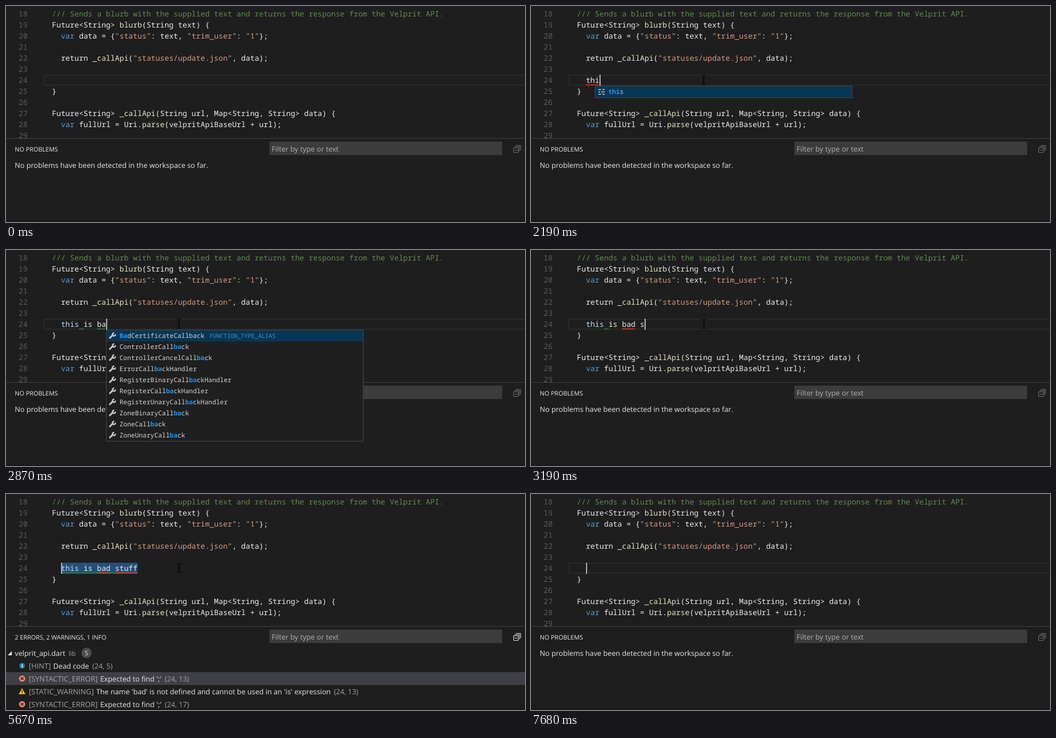
Write an HTML page that moves like this. It is 887 px wide and 371 px high and loops after 8070 ms.

```html
<!DOCTYPE html>
<html lang="en">
<head>
<meta charset="utf-8">
<title>Editor</title>
<style>
  html, body { margin: 0; width: 100%; height: 100%; overflow: hidden; background: #1e1e1e; }
  svg { display: block; }
  text { white-space: pre; text-rendering: geometricPrecision; fill: #d4d4d4; }
  .code { font: 12.83px "Noto Sans Mono", monospace; fill: #ececec; }
  .item { font: 11px "Noto Sans Mono", monospace; }
  .kind { font: 9.9px "Noto Sans Mono", monospace; fill: #4a90c4; }
  .ui { font: 12.32px "Open Sans", sans-serif; fill: #e8e8e8; }
  .head { font-size: 10.6px; }
  .tag { font-size: 12.6px; }
  .dim { fill: #a4a4a4; }
  .num { fill: #5a5a5a; }
  .comment { fill: #608b4e; }
  .string { fill: #d69a80; }
  .word { fill: #569cd6; }
  .call { fill: #e8e4c0; }
  .self { fill: #b5dcfa; }
  .hit { fill: #1b97ee; font-weight: bold; }
</style>
</head>
<body>
<svg id="stage" width="887" height="371" viewBox="0 0 887 371"></svg>
<script>
const LOOP = 8070, CHAR = 7.698, LEFT = 78.5, LINE = 19, INDENT = LEFT + 2 * CHAR;
const RED = '#f0301c', GREEN = '#1a8a24';
const stage = document.getElementById('stage');

const code = [
  '/// Sends a blurb with the supplied text and returns the response from the Velprit API.',
  'Future<String> blurb(String text) {',
  '  var data = {"status": text, "trim_user": "1"};',
  '',
  '  return _callApi("statuses/update.json", data);',
  '',
  '',
  '}',
  '',
  'Future<String> _callApi(String url, Map<String, String> data) {',
  '  var fullUrl = Uri.parse(velpritApiBaseUrl + url);',
  ''
];

const lists = {
  th: ['this', 'throw', 'then', 'the', 'MathError', 'length', 'Method', 'pathSegments', 'withPath', 'hasAuthority', 'authority', 'threshold'],
  thi: ['this'],
  is: ['is', 'isEmpty', 'isNaN', 'isNegative', 'List', 'ListBase', 'ListMixin', 'isFinite', 'isInfinite', 'HashMapList', 'Listener', 'RegisterHandler'],
  ba: ['BadCertificateCallback', 'ControllerCallback', 'ControllerCancelCallback', 'ErrorCallbackHandler',
    'RegisterBinaryCallbackHandler', 'RegisterCallbackHandler', 'RegisterUnaryCallbackHandler',
    'ZoneBinaryCallback', 'ZoneCallback', 'ZoneUnaryCallback'],
  bad: ['BadCertificateCallback'],
  st: ['String', 'static', 'Stream', 'StreamController', 'StringBuffer', 'StackTrace', 'Stopwatch', 'StateError', 'StringSink', 'StreamSink', 'stdin', 'stdout'],
  stu: ['stuckTimer']
};

// time, typed text, open list, column where the list opened
const typing = [
  [0, ''], [2020, 't'], [2100, 'th', 'th', 2], [2190, 'thi', 'thi', 2],
  [2270, 'this', 'thi', 2], [2350, 'this', 'thi', 4], [2410, 'this '],
  [2560, 'this i'], [2640, 'this is', 'is', 7], [2720, 'this is '],
  [2870, 'this is ba', 'ba', 10], [2950, 'this is bad', 'bad', 10], [3030, 'this is bad'],
  [3110, 'this is bad '], [3190, 'this is bad s'], [3270, 'this is bad st', 'st', 14],
  [3350, 'this is bad stu', 'stu', 14], [3430, 'this is bad stuf', 'stu', 14],
  [3510, 'this is bad stuf'], [3660, 'this is bad stuff'], [6210, '']
];
const caretSteps = [[0, 0], [2020, 1], [4120, 0], [5670, 1], [6130, 0], [6740, 1], [7200, 0], [7680, 1]];
const mouseSteps = [
  [0], [70, 775, 331], [150, 700, 300], [230, 608, 262], [310, 520, 214], [390, 446, 174],
  [475, 384, 145], [555, 336, 126], [635, 308, 120], [720, 296, 128], [800, 295, 136],
  [1100, 295, 132], [1180, 295, 127], [7050, 350, 156], [7130, 530, 240], [7200, 742, 336], [7280]
];

const at = (steps, t) => steps.findLast(s => s[0] <= t);
const esc = s => s.replace(/&/g, '&amp;').replace(/</g, '&lt;');
const span = (cls, s, dx = 0) => `<tspan class="${cls}" dx="${dx}">${esc(s)}</tspan>`;
const text = (cls, x, y, inner) => `<text class="${cls}" x="${x}" y="${y}">${inner}</text>`;
const rect = (x, y, w, h, fill, more = '') =>
  `<rect x="${x}" y="${y}" width="${w}" height="${h}" fill="${fill}" ${more}/>`;
const path = (d, stroke, more = '') => `<path d="${d}" fill="none" stroke="${stroke}" ${more}/>`;

function kind(token) {
  if (token[0] === '/') return 'comment';
  if (token[0] === '"') return 'string';
  return { var: 'word', this: 'self' }[token] || 'call';
}

function paint(line) {
  return line.split(/(\/\/\/.*|"[^"]*"|\bvar\b|\bthis\b|\b[_a-z]\w*(?=\())/)
    .map((s, i) => i % 2 ? span(kind(s), s) : esc(s)).join('');
}

function wave(x, end, color, y = 136.5) {
  let d = `M${x} ${y}`;
  for (let i = 0; x + 2 <= end; x += 2, i++) d += `l2 ${i % 2 ? 2 : -2}`;
  return path(d, color, 'stroke-width="1.2"');
}

function squiggles(s, selected) {
  const col = n => INDENT + n * CHAR;
  if (s.length < 2 || s === 'this') return '';
  if (s.length < 5) return wave(col(0), col(s.length), RED);
  let out = selected ? wave(col(0), col(17), GREEN) : wave(col(4), col(5) + 2, GREEN);
  if (s.length > 8) out += wave(col(8), col(Math.min(s.length, 11)), s.length > 10 ? RED : GREEN);
  if (s.length > 13) out += wave(col(12), col(s.length), RED);
  return out;
}

function editor(t, typed, selected, caret) {
  let out = selected ? rect(INDENT, 118, 17 * CHAR, LINE, '#264f78')
    : rect(65, 119, 830, 17, 'none', 'stroke="#282828" stroke-width="2"');
  code.forEach((line, i) => {
    const y = 18 + i * LINE;
    out += text('code num', 21.5, y, 18 + i) + text('code', LEFT, y, paint(line));
  });
  out += text('code', INDENT, 132, paint(typed)) + squiggles(typed, selected);
  if (t >= 2560 && t < 2870) out += wave(LEFT, LEFT + 8, RED, 155.5);
  if (caret) out += rect(Math.round(INDENT + (selected ? 0 : typed.length * CHAR)), 118, 2, LINE, '#aeafad');
  return out;
}

const icons = {
  info: y => `<circle cx="27.5" cy="${y}" r="4.8" fill="#1b80b2"/>` + rect(26.8, y - 3, 1.5, 1.5, '#fff') + rect(26.8, y - .8, 1.5, 4, '#fff'),
  error: y => `<circle cx="27.5" cy="${y}" r="5.3" fill="#f48771"/>` + path(`M25.2 ${y - 2.3}l4.6 4.6m0 -4.6l-4.6 4.6`, '#252526', 'stroke-width="1.5"'),
  warn: y => `<path d="M27.5 ${y - 5.5}l5.5 10.5h-11z" fill="#fc0"/>` + rect(26.8, y - 2, 1.5, 4, '#252526') + rect(26.8, y + 2.8, 1.5, 1.3, '#252526')
};
const problems = [
  ['info', '[HINT]', 'Dead code', '(24, 5)'],
  ['error', '[SYNTACTIC_ERROR]', "Expected to find ';'", '(24, 13)'],
  ['warn', '[STATIC_WARNING]', "The name 'bad' is not defined and cannot be used in an 'is' expression", '(24, 13)'],
  ['error', '[SYNTACTIC_ERROR]', "Expected to find ';'", '(24, 17)']
];

function panel(failing) {
  const tint = failing ? '#d8d8d8' : '#6c6c6c';
  let out = rect(0, 227, 887, 144, '#1e1e1e') + rect(0, 227, 887, 1, '#414141') +
    text('ui head', 15, 250, failing ? '2 ERRORS, 2 WARNINGS, 1 INFO' : 'NO PROBLEMS') +
    rect(450, 233, 398, 23, '#3c3c3c') +
    `<text class="ui" x="454" y="250" style="fill:#b0b0b0">Filter by type or text</text>` +
    path('M871.5 240V239.5H879.5V247.5H879M869.5 242V241.5H877.5V249.5H877M867.5 243.5h8v8h-8zM869 247.5h5', tint);
  if (!failing) out += text('ui', 15, 278, 'No problems have been detected in the workspace so far.');
  else {
    out += '<path d="M10 270v7h-7z" fill="#e8e8e8"/>' + text('ui', 15, 278, 'velprit_api.dart') +
      '<text class="ui dim" x="107" y="278" style="font-size:11px">lib</text>' +
      rect(129, 264, 17, 18, '#4d4d4d', 'rx="8.5"') +
      '<text class="ui" x="137.5" y="277" text-anchor="middle" style="font-size:10.5px">5</text>' +
      rect(0, 306, 887, 22, '#3f3f46');
    problems.forEach(([icon, tag, message, place], i) => {
      const y = 295 + i * 22;
      out += icons[icon](y) + text('ui', 39, y + 5,
        span('dim tag', tag) + span('', message, 4.2) + span('dim', place, 5.5));
    });
  }
  return out + rect(0, 369, 887, 2, '#181818');
}

function popup(key, col) {
  const rows = lists[key], x = Math.round(INDENT + col * CHAR);
  let out = rect(x + .5, 137.5, 439, rows.length * LINE + 1, '#1f1f20', 'stroke="#454545"') +
    rect(x + 1, 138, 438, LINE, '#073655');
  rows.forEach((name, i) => {
    const y = 147 + i * LINE, n = name.toLowerCase().indexOf(key), end = n + key.length;
    out += /^[a-z]/.test(name)
      ? path(`M${x + 6} ${y - 3.5}h5m2 0h4M${x + 6} ${y + .5}h3m2 0h6M${x + 6} ${y + 4.5}h5m2 0h4`, '#c5c5c5', 'stroke-width="1.6"')
      : path(`M${x + 6.5} ${y + 4}l5 -5`, '#c5c5c5', 'stroke-width="3" stroke-linecap="round"') +
        path(`M${x + 14} ${y - 4.5}a2.6 2.6 0 1 0 2 2.2`, '#c5c5c5', 'stroke-width="2.4"');
    out += text('item', x + 23, y + 4, n < 0 ? name
      : name.slice(0, n) + span('hit', name.slice(n, end)) + name.slice(end));
  });
  if (/Callback$/.test(rows[0])) out += text('kind', x + 177, 151, 'FUNCTION_TYPE_ALIAS');
  return out;
}

function pointer(x, y) {
  if (x === undefined) return '';
  if (y > 228) return `<path d="M${x + .5} ${y + .5}v16l3.7 -3.5l2.5 5.5l2.3 -1l-2.4 -5.4h5z" fill="#fff" stroke="#000"/>`;
  return path(`M${x - 3} ${y - 7.5}h3m1 0h3M${x + .5} ${y - 7}v14M${x - 3} ${y + 7.5}h3m1 0h3`, '#000', 'stroke-width="1.2"');
}

function draw(t) {
  const [, typed, list, col] = at(typing, t);
  const [, caret] = at(caretSteps, t), [, mx, my] = at(mouseSteps, t);
  const selected = t >= 5670 && t < 6210;
  return editor(t, typed, selected, caret) + panel(t >= 4120 && t < 6740) +
    (list ? popup(list, col) : '') + pointer(mx, my);
}

let shown = '';
const start = performance.now();
function tick() {
  const next = draw((performance.now() - start) % LOOP);
  if (next !== shown) stage.innerHTML = shown = next;
  requestAnimationFrame(tick);
}
tick();
</script>
</body>
</html>
```
